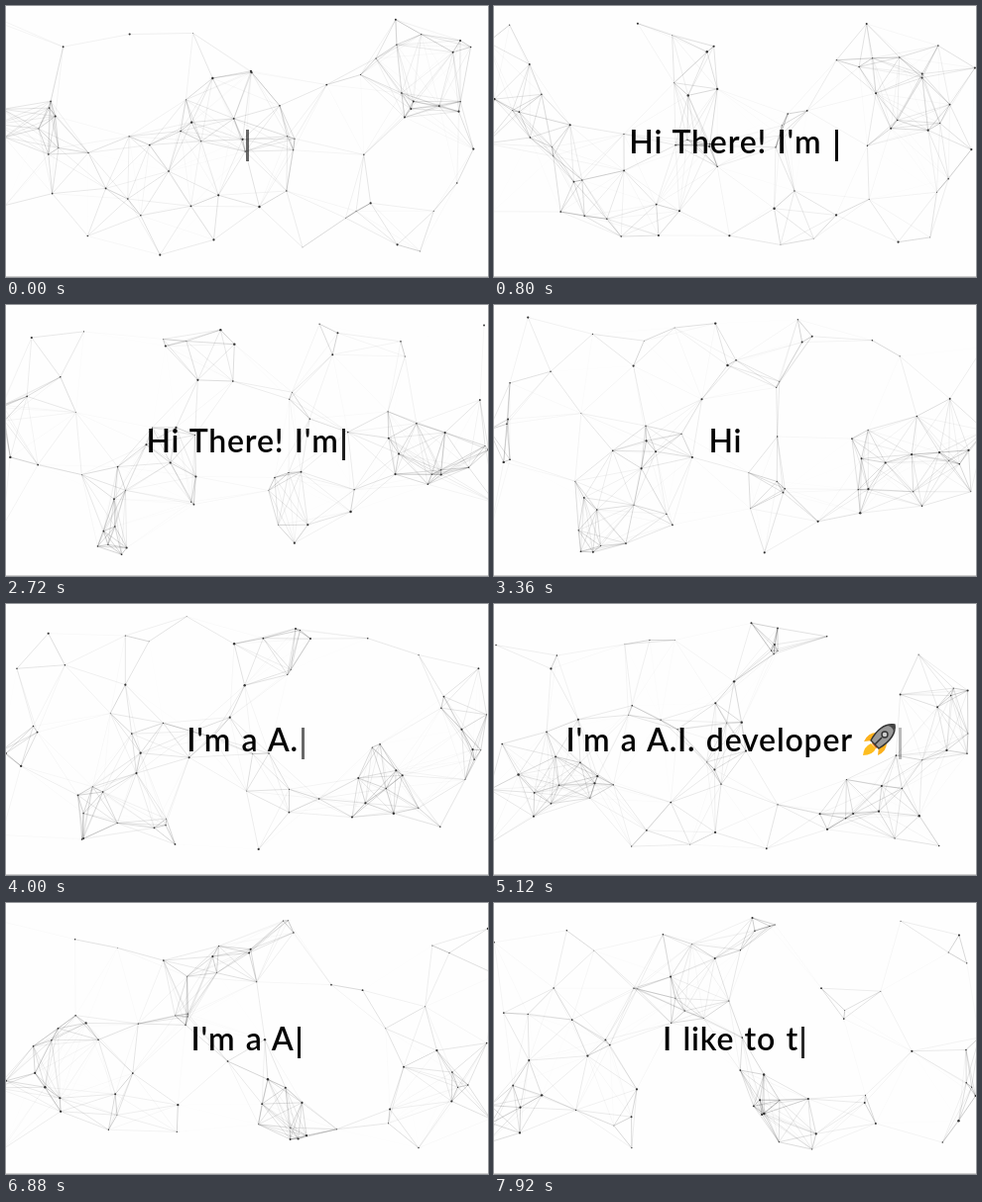
Write an HTML page with a canvas that moves like this. It is 486 px wide and 274 px high and loops after 8000 ms.

```html
<!DOCTYPE html>
<html lang="en">
<head>
<meta charset="utf-8">
<style>
  html, body { margin: 0; width: 100%; height: 100%; overflow: hidden; background: #fefefe; }
  canvas { position: absolute; left: 0; top: 0; width: 486px; height: 274px; }
  #line {
    position: absolute; left: 0; top: 117px; width: 486px; text-align: center; white-space: pre;
    font: 600 32px/40px Lato, "Open Sans", sans-serif; letter-spacing: .8px; word-spacing: 1.6px; color: #050505;
  }
  svg { display: none; width: 33px; height: 33px; vertical-align: -5px; overflow: visible; }
  #cursor { display: inline-block; width: 3px; height: 32px; margin: 0 3px; vertical-align: -8px; background: #050505; }
</style>
</head>
<body>
<canvas width="486" height="274"></canvas>
<div id="line"><span id="text"></span><svg id="wave" viewBox="0 0 33 33" fill="none" stroke-linecap="round">
  <g transform="rotate(-10 17 17)">
    <path d="M20 20L11 4M17 20L6 8M16 23L4 15M18 26L7 23M25 21L27 9" stroke="#eda91f" stroke-width="6"/>
    <ellipse cx="20" cy="22" rx="9.5" ry="10" fill="#fcc42c"/>
    <path d="M20 20L11 4M17 20L6 8M16 23L4 15M18 26L7 23M25 21L27 9" stroke="#fcc42c" stroke-width="5"/>
    <path d="M17 16L12 8M15 19L8 12M15 23L8 19" stroke="#e0991a" stroke-width=".9"/>
  </g>
  <path d="M-2 23Q0 28 5 31M1 22Q2 26 6 28M18 2Q22 3 23 7M21-1Q26 1 27 5" stroke="#555" stroke-width="1.2"/>
</svg><svg id="rocket" viewBox="0 0 33 33">
  <path d="M14 9Q5 9 1 18L10 17ZM24 19Q24 28 15 32L16 23Z" fill="#fbb01c"/>
  <path d="M8 20Q1 23 0 32Q10 32 13 25Z" fill="#fdbd1f"/>
  <path d="M9 20L13 25L17 23L11 17Z" fill="#e8781b"/>
  <path d="M32 1Q18-1 8 17L16 25Q34 14 32 1Z" fill="#999" stroke="#333" stroke-width="1.4"/>
  <path d="M25 2Q30 3 31 8Q33 4 32 1Q29 0 25 2Z" fill="#444"/>
  <circle cx="22" cy="11" r="3" fill="#ccc" stroke="#333" stroke-width="1.4"/>
  <path d="M12 21L19 14" stroke="#333" stroke-width="1.6"/>
</svg><span id="cursor"></span></div>
<script>
const LOOP = 8000, STEP = 80, TYPE = 55, ERASE = 63, HOLD = 1170;
const DOTS = 70, REACH = 88, SPEED = 35;
const LEFT = -10, RIGHT = 496, TOP = 11, BOTTOM = 254;
const $ = id => document.getElementById(id);
const ctx = document.querySelector('canvas').getContext('2d');

const phrases = [
  { text: "Hi There! I'm mofi ", icon: $('wave') },
  { text: "I'm a A.I. developer ", icon: $('rocket') },
  { text: 'I like to t' }
];

let seed = 11;
const rand = (lo, hi) => lo + (hi - lo) * (seed = seed * 16807 % 2147483647) / 2147483647;
const dots = Array.from({ length: DOTS }, () => ({
  x: rand(LEFT, RIGHT), y: rand(TOP, BOTTOM),
  vx: rand(-SPEED, SPEED), vy: rand(-SPEED, SPEED), r: rand(.3, 1.25)
}));

function bounce(v, lo, hi) {
  const span = hi - lo, m = (((v - lo) % (2 * span)) + 2 * span) % (2 * span);
  return lo + (m < span ? m : 2 * span - m);
}

function drawNet(t) {
  const s = t / 1000;
  const pts = dots.map(d => ({
    x: bounce(d.x + d.vx * s, LEFT, RIGHT), y: bounce(d.y + d.vy * s, TOP, BOTTOM), r: d.r
  }));
  ctx.clearRect(0, 0, 486, 274);
  ctx.fillStyle = '#d0d0d0';
  ctx.fillRect(0, 273, 486, 1);
  ctx.lineWidth = .6;
  ctx.fillStyle = '#333';
  pts.forEach((p, i) => {
    for (const q of pts.slice(i + 1)) {
      const d = Math.hypot(p.x - q.x, p.y - q.y);
      if (d >= REACH) continue;
      ctx.strokeStyle = `rgba(0,0,0,${.38 * (1 - d / REACH)})`;
      ctx.beginPath();
      ctx.moveTo(p.x, p.y);
      ctx.lineTo(q.x, q.y);
      ctx.stroke();
    }
    ctx.beginPath();
    ctx.arc(p.x, p.y, p.r, 0, 7);
    ctx.fill();
  });
}

// Phrase and number of its characters on show at time t
function typed(t) {
  for (const p of phrases) {
    const full = p.text.length + (p.icon ? 1 : 0);
    const held = full * TYPE + HOLD, end = held + full * ERASE;
    if (t < end) {
      const n = t < held ? Math.floor(t / TYPE) : full - Math.floor((t - held) / ERASE);
      return { p, n: Math.min(n, full) };
    }
    t -= end;
  }
}

function drawText(t) {
  const { p, n } = typed(t);
  $('text').textContent = p.text.slice(0, n);
  for (const { icon } of phrases)
    if (icon) icon.style.display = icon === p.icon && n > p.text.length ? 'inline-block' : 'none';
  // Cursor fades out and in once a second
  const beat = (t + 125) % 1000 / 500, u = (beat % 1) ** .6, e = u * u * (3 - 2 * u);
  $('cursor').style.opacity = beat < 1 ? 1 - e : e;
}

let start;
function frame(now) {
  start ??= now;
  const t = Math.floor((now - start) % LOOP / STEP) * STEP;
  drawNet(t);
  drawText(t);
  requestAnimationFrame(frame);
}
requestAnimationFrame(frame);
</script>
</body>
</html>
```
